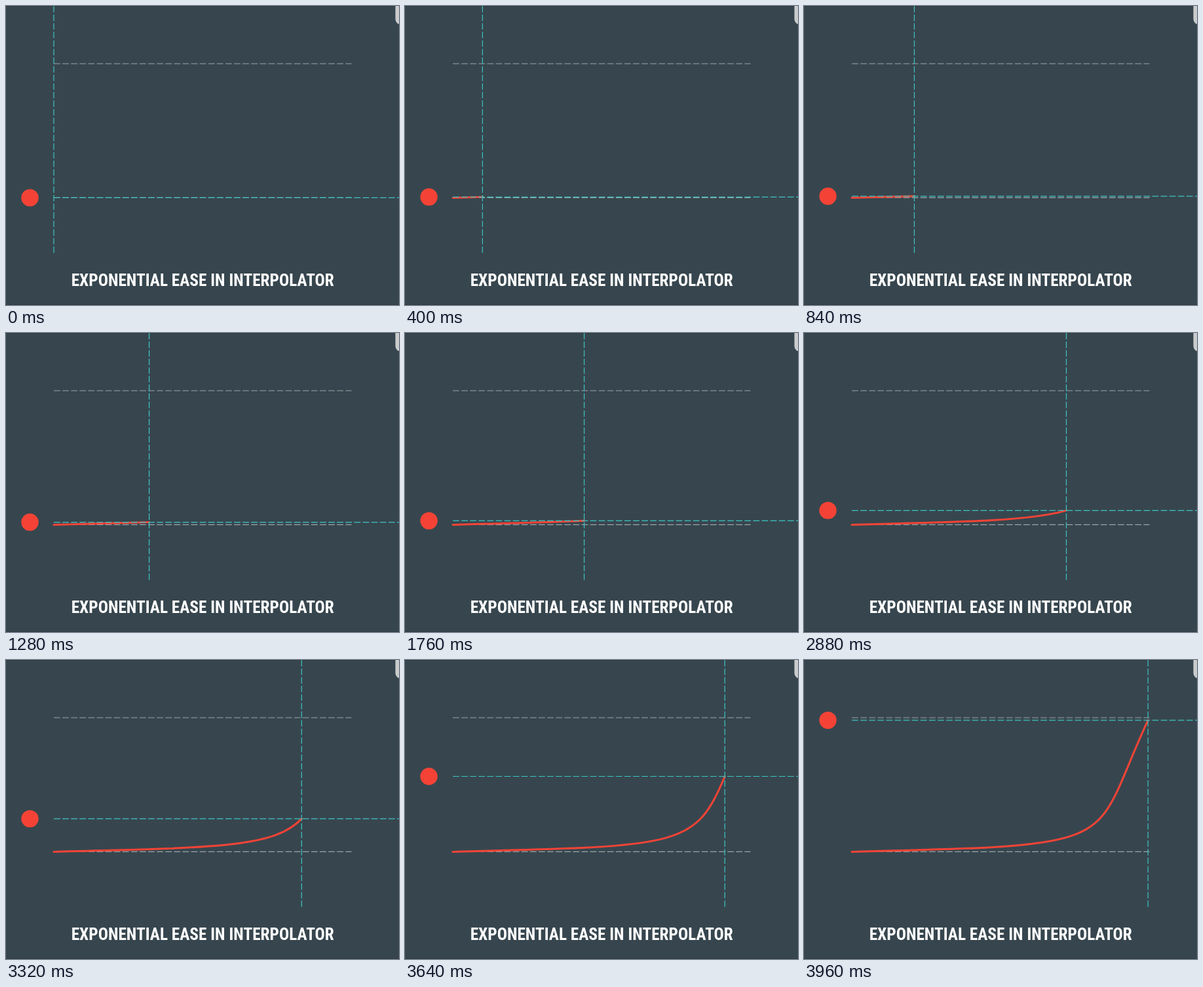
Animation of 600 by 456 pixels, one loop 4000 ms. Source, as an HTML page:

```html
<!DOCTYPE html>
<html lang="en">
<head>
<meta charset="utf-8">
<title>Exponential ease in interpolator</title>
<style>
  html, body { margin: 0; width: 100%; height: 100%; overflow: hidden; background: #37464e; }
  svg { display: block; width: 600px; height: 456px; }
  .dash { fill: none; stroke-width: 1.2; stroke-dasharray: 9.8 3.3; }
  .guide { stroke: #9aa4a8; }
  .cross { stroke: #3cc4c2; }
  .curve { fill: none; stroke: #f44336; stroke-width: 3; stroke-linecap: round; }
  text {
    font: 700 25.3px "Roboto Condensed", Roboto, sans-serif;
    font-stretch: 75%;
    fill: #fff;
    text-anchor: middle;
  }
</style>
</head>
<body>
<svg viewBox="0 0 600 456">
  <rect width="600" height="456" fill="#37464e"/>
  <path d="M0 .5H600M0 455.5H600" stroke="#2d3940"/>
  <rect x="594.5" y="-20" width="30" height="48" rx="8" fill="#c9cbcc"/>
  <path class="dash guide" d="M73 88H527.5"/>
  <path class="dash guide" d="M73 292.4H527.5"/>
  <path id="curve" class="curve"/>
  <path id="level" class="dash cross" d="M73 0H600"/>
  <path id="cursor" class="dash cross" d="M0 0V377"/>
  <circle id="ball" cx="36.5" r="13.2" fill="#f44336"/>
  <text x="300.3" y="427">EXPONENTIAL EASE IN INTERPOLATOR</text>
</svg>
<script>
const LOOP = 4000, STEP = 40;
const LEFT = 73, WIDTH = 454, BASE = 292.4, HEIGHT = 204.4;

// Cursor position over time: [ms, x]
const TRACK = [[0, 73], [400, 118.3], [1280, 218.6], [2240, 328.5],
               [2880, 400.5], [3320, 451.3], [4000, 529.8]];

// cubic-bezier(.95, .05, .795, .035) in stage coordinates
const POINTS = [[0, 0], [.95, .05], [.795, .035], [1, 1]]
  .map(([x, y]) => [LEFT + x * WIDTH, BASE - y * HEIGHT]);

const byId = id => document.getElementById(id);
const curve = byId('curve'), level = byId('level'), cursor = byId('cursor'), ball = byId('ball');

const mix = (a, b, k) => a + (b - a) * k;

function cursorX(t) {
  const i = TRACK.findIndex(([ms]) => ms > t);
  const [t0, x0] = TRACK[i - 1], [t1, x1] = TRACK[i];
  return mix(x0, x1, (t - t0) / (t1 - t0));
}

// Control points of the part of the curve from 0 to s
function headOfCurve(s) {
  let row = POINTS;
  const head = [row[0]];
  while (row.length > 1) {
    row = row.slice(1).map((p, i) => p.map((v, axis) => mix(row[i][axis], v, s)));
    head.push(row[0]);
  }
  return head;
}

function curveUpTo(x) {
  let low = 0, high = 1;
  for (let i = 0; i < 24; i++) {
    const mid = (low + high) / 2;
    if (headOfCurve(mid)[3][0] < x) low = mid; else high = mid;
  }
  return headOfCurve(low);
}

function draw(t) {
  const x = cursorX(t);
  const [start, ...rest] = curveUpTo(x);
  const y = rest[2][1];
  curve.setAttribute('d', t > 0 ? `M${start}C${rest.join(' ')}` : '');
  level.setAttribute('transform', `translate(0 ${y})`);
  cursor.setAttribute('transform', `translate(${x} 0)`);
  ball.setAttribute('cy', y);
}

const begin = performance.now();
function tick() {
  const t = (performance.now() - begin) % LOOP;
  draw(Math.floor(t / STEP) * STEP);
  requestAnimationFrame(tick);
}
tick();
</script>
</body>
</html>
```
